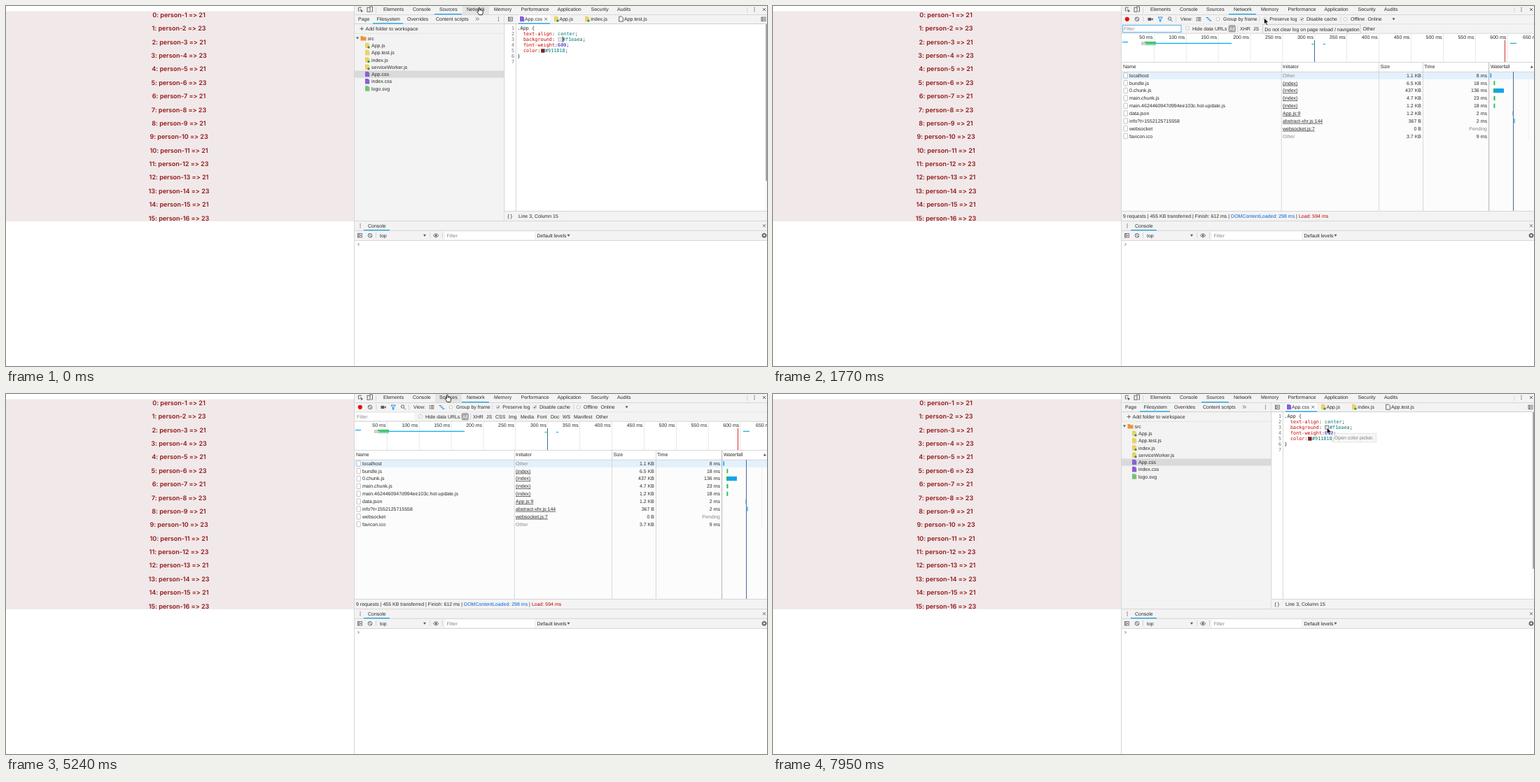
These frames come from a looping animation (1087 px wide and 515 px high, 8 s). An HTML page:

```html
<!DOCTYPE html>
<html lang="en">
<head>
<meta charset="utf-8">
<title>Developer tools session</title>
<style>
html, body { margin: 0; width: 100%; height: 100%; overflow: hidden; background: #fff; }
svg { display: block; width: 1087px; height: 515px; }
text { font: 7px "Liberation Sans", Arial, sans-serif; fill: #2a2a2a; white-space: pre; text-rendering: geometricPrecision; }
.page { font: 600 9px Inter, sans-serif; font-variant-ligatures: none; font-feature-settings: "calt" 0; fill: #911818; text-anchor: middle; }
.code { font: 6.8px "DejaVu Sans Mono", monospace; fill: #222; }
.end { text-anchor: end; }
.mute { fill: #888; }
.link { text-decoration: underline; }
.icon { fill: none; stroke: #5a5a5a; stroke-width: .9; }
</style>
</head>
<body>
<svg id="stage" viewBox="0 0 1087 515"></svg>
<script>
const BAR = '#f3f3f3', LINE = '#cdcdcd', BLUE = '#03a9f4', GREEN = '#1ebe50', INK = '#5a5a5a';
const JS = '#ecd06a', CSS = '#8a5fd6';

const rect = (x, y, w, h, fill, more = '') => `<rect x="${x}" y="${y}" width="${w}" height="${h}" fill="${fill}" ${more}/>`;
const text = (x, cy, s, cls = '', more = '') => `<text x="${x}" y="${cy + 2.5}" class="${cls}" ${more}>${s}</text>`;
const path = (d, more = 'class="icon"') => `<path d="${d}" ${more}/>`;
const hline = (x, y, w, color = LINE) => rect(x, y, w, .8, color);
const vline = (x, y, h, color = LINE) => rect(x, y, .8, h, color);
const underline = (x, y, w, more) => rect(x, y, w, 1.3, '#1ba1e2', more);
const group = (id, body) => `<g id="${id}">${body}</g>`;
const row = (items, cy) => items.map(([x, s]) => text(x, cy, s)).join('');

const down = (x, y) => path(`M${x - 2} ${y - 1.5}h4l-2 3.2z`, `fill="${INK}"`);
const dots = (x, y) => [-2.4, 0, 2.4].map(d => rect(x - .6, y + d - .6, 1.2, 1.2, INK)).join('');
const cross = (x, y) => path(`M${x - 2} ${y - 2}l4 4m0-4l-4 4`);
const forbid = (x, y) => `<circle cx="${x}" cy="${y}" r="2.8" class="icon"/>` + path(`M${x - 2} ${y - 2}l4 4`);
const panelIcon = (x, y) => rect(x - 3, y - 2.7, 6, 5.4, 'none', `stroke="${INK}" stroke-width=".8"`) +
  path(`M${x - 1.5} ${y - 2.7}v5.4`) + path(`M${x} ${y - 1.6}l2 1.6l-2 1.6z`, `fill="${INK}"`);
const tick = (x, y) => path(`M${x - 1.4} ${y}l1.1 1.3l1.9-2.8`, 'fill="none" stroke="#333" stroke-width=".9"');
const box = (x, y) => rect(x - 2.2, y - 2.2, 4.4, 4.4, '#fff', 'rx=".8" stroke="#b5b5b5" stroke-width=".7"');
const file = (x, y, color, dot) => path(`M${x - 3} ${y - 3.7}h4.2l2 2v5.4h-6.2z`, `fill="${color}"`) +
  (dot ? `<circle cx="${x + 2}" cy="${y + 2.6}" r="1.6" fill="#1a9c3c"/>` : '');

function page() {
  let out = rect(0, 7.5, 497, 300.5, '#f1e8e9');
  for (let i = 0; i < 16; i++)
    out += text(247, 13.5 + i * 19.37, `${i}: person-${i + 1} =&gt; ${i % 2 ? 23 : 21}`, 'page');
  return out;
}

function frame() {
  const tabs = [[539, 'Elements'], [581, 'Console'], [619, 'Sources'], [658, 'Network'], [697, 'Memory'],
    [735.5, 'Performance'], [787.5, 'Application'], [835.5, 'Security'], [873, 'Audits']];
  return rect(497, 0, 590, 12, BAR) + rect(0, 0, 38, 12, '#e4e4e4', 'id="hover"') +
    path('M508 2.2h-4.6v4.8h1.8') + path('M506 4l4.3 3.4-2 .3-1 1.8z', `fill="${INK}"`) +
    rect(516, 2.2, 4, 6, 'none', 'class="icon"') + path('M519 1h4.5v7h-2') + vline(528, 2, 8) +
    row(tabs, 4.7) + hline(498, 12, 589) + underline(0, 11, 39, 'id="activeTab"') +
    vline(1058.5, 2, 8) + dots(1069, 5) + cross(1083, 5);
}

function drawer() {
  return rect(498, 307.5, 589, 27.5, BAR) + hline(498, 307.3, 589) + hline(498, 320.8, 589) + hline(498, 335, 589) +
    dots(506, 314.5) + text(517, 314.3, 'Console') + underline(511, 320, 37) + cross(1083, 314.3) +
    panelIcon(505.5, 328.3) + forbid(520, 328.3) + vline(528, 324, 8) + text(534, 328.3, 'top') + down(598, 328.3) +
    vline(605.5, 324, 8) + path('M610.3 328.3q3.8-5 7.6 0q-3.8 5-7.6 0z') +
    `<circle cx="614.1" cy="328.3" r="1.4" fill="${INK}"/>` + vline(623, 324, 8) +
    rect(627, 322.5, 128, 11.5, '#fff') + text(629.5, 328.3, 'Filter', 'mute') +
    text(758.5, 328.3, 'Default levels') + down(803.5, 328.3) +
    `<circle cx="1083" cy="328.3" r="2.2" class="icon" style="stroke-width:1.5"/>` +
    `<circle cx="1083" cy="328.3" r="3.3" class="icon" stroke-dasharray="1.3 1.3"/>` +
    path('M502.6 339.2l1.8 1.8-1.8 1.8', 'fill="none" stroke="#367cf1" stroke-width="1"');
}

function networkBars() {
  const kinds = [[667, 'XHR'], [686, 'JS'], [699, 'CSS'], [718, 'Img'], [735, 'Media'], [758.5, 'Font'],
    [778, 'Doc'], [795, 'WS'], [811, 'Manifest'], [842.5, 'Other']];
  return rect(498, 12.8, 589, 26.2, BAR) + hline(498, 25.5, 589, '#e2e2e2') + hline(498, 38.8, 589) +
    '<circle cx="505.8" cy="18.8" r="3.1" fill="#e80d0d"/>' + forbid(520, 18.8) + vline(528.5, 15, 8) +
    rect(535.5, 16.8, 4.8, 4.2, INK) + path('M540.2 18.9l2.4-1.8v3.6z', `fill="${INK}"`) +
    path('M550 16h6.4l-2.5 3v3.2h-1.4v-3.2z', 'fill="none" stroke="#1a8fe8" stroke-width="1"') +
    '<circle cx="566.6" cy="18" r="2.2" class="icon"/>' + path('M568.2 19.7l2.5 2.6') + vline(575, 15, 8) +
    text(582, 18.8, 'View:') +
    [0, 2.2, 4.4].map(d => rect(604.5, 16 + d, 1.4, 1.1, INK) + rect(606.6, 16 + d, 4.8, 1.1, INK) +
      rect(618.5 + d, 16 + d, 3.5, 1.2, '#1a8fe8')).join('') +
    box(635.5, 18.8) + text(643, 18.8, 'Group by frame') + vline(694.5, 15, 8) +
    box(702.8, 18.8) + group('preserved', tick(702.8, 18.8)) + text(709.3, 18.8, 'Preserve log') +
    box(755.3, 18.8) + tick(755.3, 18.8) + text(762, 18.8, 'Disable cache') + vline(810.5, 15, 8) +
    box(817.6, 18.8) + text(825, 18.8, 'Offline') + text(849.5, 18.8, 'Online') + down(886.5, 18.8) +
    rect(499, 27, 84, 10.5, '#fff') +
    group('focus', rect(499.5, 27.5, 83.5, 10, 'none', 'stroke="#55b4ee"')) +
    text(501, 32.4, 'Filter', 'mute') + rect(501.2, 28.5, .7, 7.5, '#222', 'id="filterCaret"') +
    box(592, 31.8) + text(599, 32.4, 'Hide data URLs') +
    rect(650.5, 27.3, 10.5, 10.3, '#a3a3a3', 'rx="2.5"') + text(652, 32.4, 'All', '', 'style="fill:#fff"') +
    vline(663.3, 28, 9) + row(kinds, 32.4);
}

function overview() {
  let out = '';
  for (let i = 1; i <= 13; i++) {
    const x = 498 + i * 45.9;
    out += vline(x, 39.5, 41, '#e3e3e3');
    out += i < 13 ? text(x - 1.5, 44.8, `${i * 50} ms`, 'end') : text(1071, 44.8, '650 ms');
  }
  const bars = [[499, 51, 8, 1.2, BLUE], [526, 51, 7, 5, '#cfcfcf'], [531, 51, 16, 1.6, GREEN], [533, 52.8, 14, 1.5, GREEN],
    [532, 54.6, 15, 1.5, '#6fd28f'], [546, 52.8, 109, 1.2, BLUE], [769.5, 54, 3, 1.2, GREEN], [786, 54, 3, 1.2, BLUE],
    [1053, 52.8, 9, 1.2, '#1cb0c8']];
  return out + bars.map(b => rect(...b)).join('') +
    rect(773, 49, 1, 31, '#3a6ea8') + rect(1045, 49, 1, 31, '#d03030') + hline(498, 80, 589);
}

function requests() {
  // name, initiator, size, time, waterfall start, width, colour
  const rows = [
    ['localhost', 'Other', '1.1 KB', '8 ms', 1024.5, 1.6, BLUE],
    ['bundle.js', '(index)', '6.5 KB', '18 ms', 1029.5, 1.8, GREEN],
    ['0.chunk.js', '(index)', '437 KB', '136 ms', 1030.5, 13.5, '#12a5ee'],
    ['main.chunk.js', '(index)', '4.7 KB', '23 ms', 1029.5, 2, GREEN],
    ['main.4624460947d994ee103c.hot-update.js', '(index)', '1.2 KB', '18 ms', 1029.5, 1.8, GREEN],
    ['data.json', 'App.js:9', '1.2 KB', '2 ms', 1056.5, 1.2, BLUE],
    ['info?t=1552125715558', 'abstract-xhr.js:144', '367 B', '2 ms', 1058.5, 1.2, BLUE],
    ['websocket', 'websocket.js:7', '0 B', 'Pending', 0, 0, 'none'],
    ['favicon.ico', 'Other', '3.7 KB', '9 ms', 0, 0, 'none']];
  const heads = [[500, 'Name'], [728, 'Initiator'], [867.5, 'Size'], [930, 'Time'], [1025, 'Waterfall']];
  let out = rect(498, 94, 589, 199, '#fcfcfc') + rect(498, 94.1, 589, 10.8, '', 'id="firstRow"') +
    hline(498, 93.8, 589) + row(heads, 86.8) + path('M1081.8 88.6h4l-2-3.6z', `fill="${INK}"`);
  rows.forEach(([name, by, size, time, x, w, color], i) => {
    const y = 99.3 + i * 10.84;
    out += rect(501, y - 3.6, 5.4, 7.4, '#fff', 'rx="1" stroke="#aaa" stroke-width=".7"') + text(509, y, name) +
      text(728, y, by, by === 'Other' ? 'mute' : 'link') + text(926, y, size, 'end') +
      text(1020, y, time, time === 'Pending' ? 'end mute' : 'end') + rect(x, y - 3, w, 6.2, color);
    if (i === 2) out += rect(1029, y - 3, 2, 6.2, GREEN);
  });
  return out + [725.8, 865, 928].map(x => vline(x, 81, 212)).join('') +
    vline(1022.3, 81, 212, '#a2a2a2') + rect(1057, 94, 1, 199, '#4f6a98') + vline(1079, 94, 97, '#eee') +
    rect(498, 293.5, 589, 14, BAR) + hline(498, 293, 589) +
    text(500, 300.5, '9 requests | 455 KB transferred | Finish: 612 ms | <tspan fill="#0b63d0">DOMContentLoaded: 298 ms</tspan> | <tspan fill="#c80000">Load: 594 ms</tspan>');
}

function fileTree() {
  const files = [['App.js', JS, 1], ['App.test.js', JS, 0], ['index.js', JS, 1], ['serviceWorker.js', JS, 1],
    ['App.css', CSS, 0], ['index.css', CSS, 0], ['logo.svg', '#74c476', 0]];
  let out = rect(498, 12.8, 214, 295, BAR) + hline(498, 25, 589) + hline(498, 38.8, 213.5, '#dedede') +
    row([[503, 'Page'], [529.5, 'Filesystem'], [573, 'Overrides'], [614, 'Content scripts']], 18.4) +
    path('M671 16.5l2 2-2 2m2.5-4l2 2-2 2') + dots(703.5, 18.8) + underline(524, 24.3, 43) +
    path('M508.3 29.8v5.4m-2.7-2.7h5.4') + text(513.5, 32.5, 'Add folder to workspace') +
    down(502, 46) + path('M506.5 43h3l1 1.2h4v5.3h-8z', 'fill="#e8973a"') + text(516.5, 46.2, 'src') +
    rect(498, 92.5, 213.5, 10.2, '#dadada');
  files.forEach(([name, color, dot], i) => {
    const y = 56.5 + i * 10.25;
    out += file(516, y, color, dot) + text(522, y, name);
  });
  return out + vline(711.5, 12.8, 295);
}

function editor() {
  const PROP = '#c80000', VALUE = '#077';
  const code = (x, n, s, color = '#222') => text(x, 23.6 + n * 8.03, s, 'code', `style="fill:${color}"`);
  let out = rect(712.3, 12.8, 375, 12.2, BAR) + rect(732, 12.8, 45, 12.2, '#fff') + hline(712, 25, 375) +
    panelIcon(720.5, 18.8) + file(737, 18.5, CSS) + file(786, 18.5, JS, 1) + file(830, 18.5, JS, 1) +
    path('M875.6 15h3.8l2 2v5.2h-5.8z') + cross(771.2, 18.6) + panelIcon(1082, 18.8) +
    row([[741, 'App.css'], [790.5, 'App.js'], [835.3, 'index.js'], [883, 'App.test.js']], 18.4) +
    underline(732, 24.3, 45) + vline(728.2, 25.5, 268) + rect(1083.3, 25.8, 3.7, 267.5, '#fafafa') +
    rect(1085.3, 26, 1.7, 224, '#9c9c9c');
  for (let n = 1; n <= 7; n++) out += text(726, 23.6 + n * 8.03, n, 'code end', 'style="fill:#777"');
  return out + code(730.5, 1, '.App {') +
    code(739, 2, `<tspan fill="${PROP}">text-align</tspan>: <tspan fill="${VALUE}">center</tspan>;`) +
    code(739, 3, `<tspan fill="${PROP}">background</tspan>:`) +
    rect(788.8, 45.3, 5, 5, '#f1eaea', 'id="swatch" stroke-width=".7"') +
    code(795, 3, `<tspan fill="${VALUE}">#f1eaea</tspan>;`) +
    code(739, 4, `<tspan fill="${PROP}">font-weight</tspan>:<tspan fill="#1c00cf">600</tspan>;`) +
    code(739, 5, `<tspan fill="${PROP}">color</tspan>:`) +
    rect(764.3, 61.5, 5, 5, '#911818', 'stroke="#555" stroke-width=".5"') +
    code(770, 5, `<tspan fill="${VALUE}">#911818</tspan>;`) + code(730.5, 6, '}') +
    rect(795, 43.8, .9, 8, '#111', 'id="codeCaret"') +
    rect(712.3, 293.5, 375, 14, BAR) + hline(712, 293, 375) +
    text(716.5, 300.3, '{ }') + text(732, 300.5, 'Line 3, Column 15');
}

const tooltip = (id, x, y, w, s) => group(id,
  rect(x, y, w, 12.8, '#f2f2f2', 'stroke="#c4c4c4" stroke-width=".7"') + text(x + 3, y + 6.5, s));

const cursors = group('cursor',
  group('arrow', path('M0 0v9l2-1.9 1.5 3.3 1.5-.7-1.5-3.1h2.8z', 'fill="#000" stroke="#fff" stroke-width=".7"')) +
  group('hand', path('M-.4 5.6V1.2q0-1.2 .9-1.2t.9 1.2v2.5q1-.8 1.6 .1q1-.5 1.5 .4q1.3-.3 1.3 1v2.2l-1 3h-4.4l-1.3-2.2-1.7-2q.6-1.3 2.2-.6z',
    'fill="#fff" stroke="#111" stroke-width=".9" stroke-linejoin="round"')) +
  group('beam', path('M-1.5 0q1.5 0 1.5 1v8q0 1-1.5 1m3-10q-1.5 0-1.5 1m0 8q0 1 1.5 1',
    'fill="none" stroke="#222" stroke-width=".8"')));

document.getElementById('stage').innerHTML =
  rect(0, 0, 1087, 515, '#fff') + page() +
  group('network', networkBars() + overview() + requests()) +
  group('sources', fileTree() + editor()) +
  frame() + drawer() + vline(497, 0, 515) +
  tooltip('logTip', 699.3, 26.6, 139.8, 'Do not clear log on page reload / navigation') +
  tooltip('pickerTip', 798.8, 56.2, 62.5, 'Open color picker.') + cursors;

const LOOP = 8000;
// Pointer samples: time, x, y
const trail = [
  [0, 675.5, 2.3], [500, 714, 9], [710, 741, 27], [880, 738, 36], [1060, 722, 30], [1240, 706, 22], [1420, 702, 18.5],
  [1600, 701.5, 17.5], [1770, 701.5, 17], [2670, 688, 31], [2850, 640, 75], [3030, 580, 115], [3200, 545.5, 134.5],
  [3410, 548, 160], [3610, 556, 177], [3820, 575, 181], [4000, 610, 166], [4180, 640, 140], [4350, 661, 105],
  [4520, 673, 65], [4700, 683, 26], [4880, 668, 15], [5060, 644, 8], [5240, 629.8, 1.2], [6500, 635, 10],
  [6680, 672, 25], [6860, 722, 48], [7050, 775, 66], [7230, 797, 66], [7410, 796, 56], [7590, 793, 50], [7770, 791.3, 48]];

const el = id => document.getElementById(id);
const show = (id, on) => el(id).style.display = on ? '' : 'none';
const within = (t, a, b) => t >= a && t < b;

function render(t) {
  const network = within(t, 200, 6140);
  const [, x, y] = trail.findLast(([start]) => start <= t);
  show('network', network);
  show('sources', !network);
  el('activeTab').setAttribute('x', network ? 651 : 612);

  const onTabs = y < 12, onRows = network && y > 94, onCode = !network && x > 729 && y > 25 && t < 7410;
  // The tab highlight fades a moment after the pointer leaves
  show('hover', onTabs || within(t, 500, 880));
  el('hover').setAttribute('x', x < 651 ? 613 : x < 691 ? 652 : 691);
  const shape = onTabs || onRows ? 'hand' : onCode ? 'beam' : 'arrow';
  for (const id of ['arrow', 'hand', 'beam']) show(id, id === shape);
  el('cursor').setAttribute('transform', `translate(${x} ${y})`);

  show('focus', t < 2130);
  show('filterCaret', within(t, 1060, 1600));
  show('preserved', t >= 2130);
  show('logTip', within(t, 1420, 2130));
  el('firstRow').setAttribute('fill', within(t, 3030, 4350) ? '#eff6fd' : '#e3f1fd');

  show('codeCaret', !within(t, 6680, 7230) && t < 7590);
  el('swatch').setAttribute('stroke', t >= 7590 ? '#444' : '#aaa');
  show('pickerTip', t >= 7950);
  el('pickerTip').style.opacity = .6;
}

function loop() {
  render(performance.now() % LOOP);
  requestAnimationFrame(loop);
}
loop();
</script>
</body>
</html>
```
